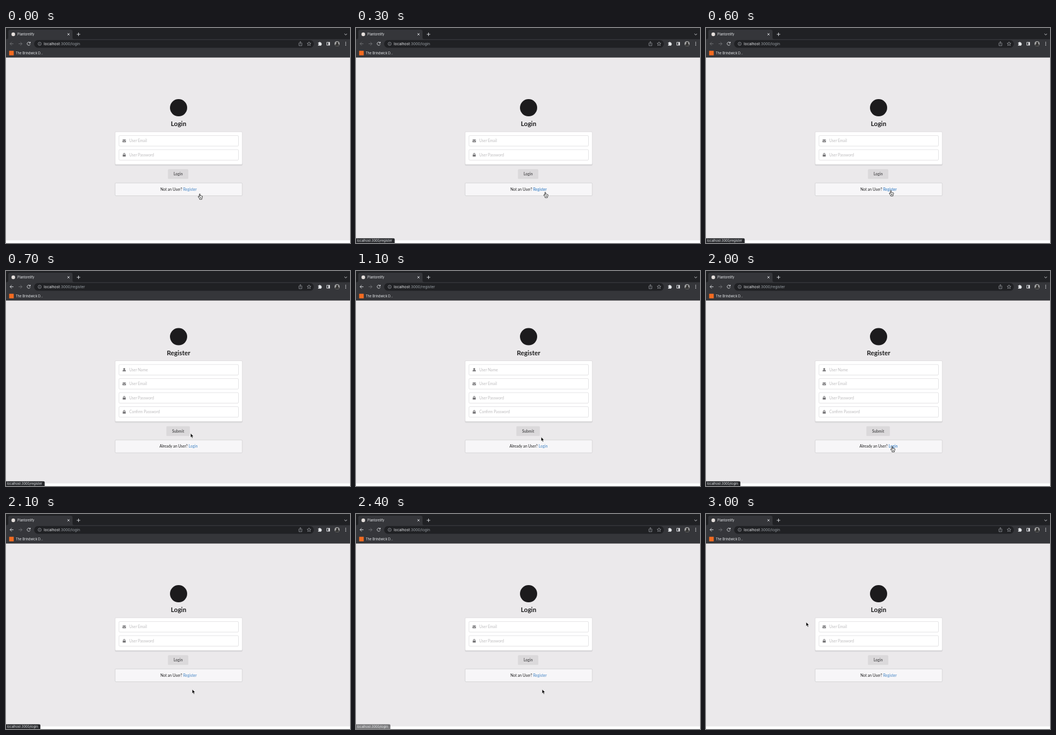
These frames come from a looping animation (600x375 px, 5200 ms). An HTML page:

```html
<!DOCTYPE html>
<html lang="en">
<head>
<meta charset="utf-8">
<title>Login</title>
<style>
  html, body { margin: 0; width: 100%; height: 100%; overflow: hidden; background: #fff; }
  svg { display: block; width: 100vw; height: 100vh; }
  .ui { font: 5.55px Inter, Roboto, sans-serif; fill: #e8eaed; }
  .url { font-size: 6.5px; }
  .dim { fill: #9aa0a6; }
  .line { fill: none; stroke: #dfe1e5; stroke-width: .9; }
  .page { font: 6.67px Lato, sans-serif; fill: #1f1f20; }
  .mid { text-anchor: middle; }
  .bold { font-weight: 700; }
  .title { font-size: 11.3px; }
  .hint { fill: #bdbcbe; }
  .card { fill: #fff; stroke: #d0cfd1; stroke-width: .6; }
  .field { fill: #fff; stroke: #d2d1d4; stroke-width: .6; }
  .icon { fill: #747376; }
  .link { fill: #4183c4; }
  .hover .link { fill: #1e70bf; }
</style>
</head>
<body>
<svg viewBox="0 0 600 375">
  <rect width="600" height="52" fill="#202124"/>
  <path d="M1 19.5q3 0 3-3V6q0-3 3-3H113q3 0 3 3V16.500q0 3 3 3H600V51.500H0V19.500Z" fill="#35363a"/>
  <rect x="49" y="21" width="488" height="13.500" rx="6.750" fill="#202124"/>
  <rect y="51.500" width="600" height="319" fill="#ebe9eb"/>

  <g class="ui">
    <circle cx="12.700" cy="11" r="3.200" fill="#e4dedb"/>
    <text x="20" y="13">Plantorelify</text>
    <rect x="5.500" y="39.700" width="8" height="8" fill="#f36b21"/>
    <text x="17" y="45.600">The Brindwick D...</text>
    <text class="url" x="66" y="29.800">localhost<tspan class="dim">:3000/<tspan id="path"></tspan></tspan></text>
  </g>

  <g class="line">
    <path d="M107.200 9.200l3.600 3.600m0-3.600l-3.600 3.600M123.500 11h6m-3-3v6M590.300 10l2.200 2.200 2.200-2.200"/>
    <path id="back" d="M13 27.500H7m3-3l-3 3 3 3"/>
    <path d="M22 27.500h6m-3-3l3 3-3 3" stroke="#737478"/>
    <path d="M42 25.800a2.800 2.800 0 1 0 .3 2.600M42.400 24v2.300h-2.300"/>
    <g stroke="#a9adb2" stroke-width=".7">
      <circle cx="58.700" cy="27.600" r="2.800"/>
      <path d="M58.700 27.200v1.800m0-3.200v.7"/>
      <path d="M512 26h-1v4.800h5V26h-1m-1.500 2.500v-4.700m-1.400 1.400l1.400-1.400 1.400 1.400"/>
      <path d="M528.500 24.200l1 2.200 2.300.2-1.700 1.600.5 2.400-2.100-1.300-2.100 1.300.5-2.400-1.700-1.600 2.300-.2z"/>
    </g>
    <rect x="559.600" y="25" width="5" height="5"/>
  </g>
  <g fill="#e8eaed">
    <path d="M544.500 25.300h1.600a1.100 1.100 0 0 1 2.200 0h1.600v1.700a1.100 1.100 0 0 1 0 2.200v1.600h-5.400v-1.700a1 1 0 0 0 0-2.100z"/>
    <path d="M562.300 25h2.300v5h-2.300z"/>
    <circle cx="592.500" cy="25" r=".75"/><circle cx="592.500" cy="27.500" r=".75"/><circle cx="592.500" cy="30" r=".75"/>
  </g>
  <circle cx="577.500" cy="27.500" r="4.500" fill="#a5a5a5"/>
  <path d="M574 30.300q.5-2.300 2.500-2.700a1.900 1.900 0 1 1 2.500 0q2 .5 2 2.500a4.500 4.500 0 0 1-7 .2z" fill="#343434"/>

  <g id="login" class="page"></g>
  <g id="register" class="page"></g>

  <g id="status" class="ui">
    <path id="bubble" fill="#292a2d"/>
    <text x="1.800" y="373.300" id="target"></text>
  </g>

  <g id="cursor" stroke-linejoin="round">
    <path id="arrow" d="M0 0V7l1.600-1.500 1.100 2.700 1.300-.5-1.100-2.600h2.200z" fill="#000" stroke="#fff" stroke-width=".5"/>
    <path id="hand" d="M-.8.800q0-.8.700-.8t.8.800v2.900q.5-.6 1.300 0 .8-.5 1.400.2 1.200-.3 1.300.8 0 2-1 3.300v1.500H-.5V8.300Q-1.700 7-2.700 5.200q-.2-1 .7-.9.700.2 1.200 1zM.9 5.800v1.900m1.200-1.900v1.900" fill="#fff" stroke="#000" stroke-width=".75"/>
  </g>
</svg>
<script>
const $ = id => document.getElementById(id);
const PERIOD = 5200, STEP = 100, ROW = 24.5;

const icons = {
  mail: '<path d="M-3-2.300H3V-1.700L0 .7-3-1.700zM-3-.8L0 1.500 3-.8V2.400H-3z"/>',
  lock: '<path d="M-2.600-.4h.7v-1a1.900 1.900 0 0 1 3.800 0v1h.7V3H-2.600zM-.9-.4H.9v-1a.9.900 0 0 0-1.800 0z"/>',
  user: '<circle cy="-1.300" r="1.700"/><path d="M-3 2.800Q-3 .3-1.200.2q1.200.8 2.400 0Q3 .3 3 2.800z"/>'
};

function box(x, y, w, h, attrs) {
  return `<rect x="${x}" y="${y}" width="${w}" height="${h}" rx="1.600" ${attrs}/>`;
}

// Builds one form; y is the centre of its first field.
function form(title, y, fields, button, width, question, link) {
  const last = y + ROW * (fields.length - 1);
  const rows = fields.map(([icon, hint], i) => {
    const c = y + ROW * i;
    return box(197, c - 9.2, 208.5, 18.4, 'class="field"') +
      `<g class="icon" transform="translate(206.200 ${c})">${icons[icon]}</g>` +
      `<text class="hint" x="215" y="${c + 2.3}">${hint}</text>`;
  });
  return `<circle cx="301" cy="${y - 57.7}" r="15" fill="#1c1b1d"/>
    <text class="mid bold title" x="301" y="${y - 25.8}">${title}</text>` +
    box(190.3, last + 14, 221.8, 4.5, 'fill="#dddcde" stroke="#c9c8ca" stroke-width=".5"') +
    box(190.3, y - 15.8, 221.8, last - y + 32.5, 'class="card"') + rows.join('') +
    box(300.2 - width / 2, last + 25, width, 17, 'fill="#dbd9db"') +
    `<text class="mid bold" x="300.200" y="${last + 36}" fill="#5a595b">${button}</text>` +
    box(190.3, last + 49, 221.8, 22.3, 'fill="#f7f6f8" stroke="#c5c4c7" stroke-width=".6"') +
    `<text class="mid" x="301" y="${last + 62.5}">${question} <tspan class="link">${link}</tspan></text>`;
}

const email = ['mail', 'User Email'], password = ['lock', 'User Password'];
$('login').innerHTML = form('Login', 196.8, [email, password],
  'Login', 35.5, 'Not an User?', 'Register');
$('register').innerHTML = form('Register', 172.3,
  [['user', 'User Name'], email, password, ['lock', 'Confirm Password']],
  'Submit', 41, 'Already an User?', 'Login');

// Pointer stops: time, x, y
const stops = [
  [0, 338, 289.3], [600, 322.5, 283.5], [700, 322, 283.3], [900, 322, 283.3],
  [1200, 323.5, 293], [1300, 323.5, 293], [1400, 324, 295.3], [1800, 325, 306],
  [2400, 324.7, 306], [2600, 174.7, 188.7], [PERIOD, 174.7, 188.7]
];

function pointer(t) {
  const i = stops.findIndex(s => s[0] > t);
  const [t0, x0, y0] = stops[i - 1], [t1, x1, y1] = stops[i];
  const k = (t - t0) / (t1 - t0);
  return [x0 + (x1 - x0) * k, y0 + (y1 - y0) * k];
}

const within = (t, a, b) => t >= a && t < b;
const show = (id, on) => $(id).style.display = on ? '' : 'none';

function draw(t) {
  const registering = within(t, 700, 2100);
  const name = registering ? 'register' : 'login';
  const hand = t < 700 || within(t, 1600, 2100);
  show('login', !registering);
  show('register', registering);
  $('path').textContent = name;
  $('back').style.stroke = t < 700 ? '#737478' : '';
  $('login').classList.toggle('hover', within(t, 300, 700));
  $('register').classList.toggle('hover', within(t, 1600, 2100));

  const leaving = t < 1500;
  const full = within(t, 300, 1000) || within(t, 1700, 2400);
  const fading = t === 1000 || t === 2400;
  $('status').style.opacity = full ? 1 : fading ? .6 : 0;
  $('target').textContent = 'localhost:3000/' + (leaving ? 'register' : 'login');
  $('bubble').setAttribute('d', `M0 366.800H${leaving ? 65.5 : 58}q2 0 2 2V375H0z`);

  $('cursor').setAttribute('transform', `translate(${pointer(t)})`);
  show('hand', hand);
  show('arrow', !hand);
}

const start = performance.now();
function tick() {
  const t = (performance.now() - start) % PERIOD;
  draw(Math.floor(t / STEP) * STEP);
  requestAnimationFrame(tick);
}
tick();
</script>
</body>
</html>
```
